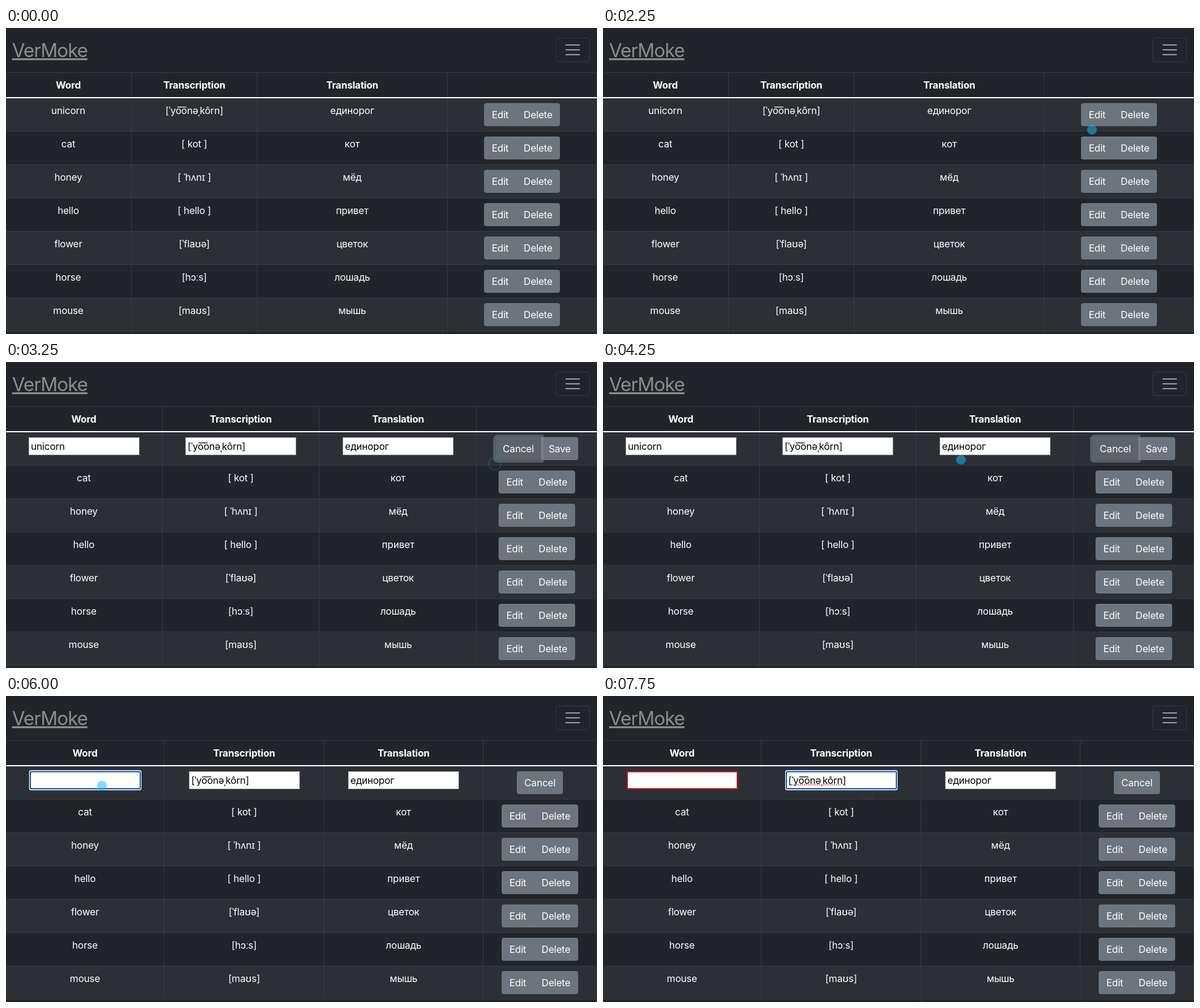
An HTML page that plays this animation: 973x505 px, repeating every 8 s.

```html
<!DOCTYPE html>
<html lang="en">
<head>
<meta charset="utf-8">
<style>
  html, body { margin: 0; width: 100%; height: 100%; overflow: hidden; background: #212529; }
  svg { display: block; font: 16px Inter, "Noto Sans", "DejaVu Sans", sans-serif; letter-spacing: -.2px; fill: #fff; }
  .mid { text-anchor: middle; }
  .head { font-weight: 700; }
  .brand { font-size: 31px; letter-spacing: -1px; fill: #8c8c8c; text-decoration: underline; text-decoration-thickness: 2px; }
</style>
</head>
<body>
<svg id="stage" width="973" height="505" viewBox="0 0 973 505"></svg>
<script>
const LOOP = 8000, STEP = 250;
const words = [
  ['unicorn', '[ˈyoonəˌkôrn]', 'единорог'],
  ['cat', '[ kot ]', 'кот'],
  ['honey', '[ ˈhʌnɪ ]', 'мёд'],
  ['hello', '[ hello ]', 'привет'],
  ['flower', '[ˈflaʊə]', 'цветок'],
  ['horse', '[hɔːs]', 'лошадь'],
  ['mouse', '[maʊs]', 'мышь']
];
const layouts = {
  view:  { lines: [206.5, 413.5, 726.5], centers: [102.5, 310, 570], buttons: 787 },
  edit:  { lines: [257.5, 515.5, 774.5], centers: [128, 386.5, 645.5], buttons: 811 },
  empty: { lines: [260.5, 523.5, 785.5], centers: [130, 392, 654.5], buttons: 816 }
};
// Pointer path: time, x, y
const path = [
  [750, 822, 175], [1500, 529, 126], [1750, 704, 148], [2000, 809, 175], [2250, 805, 168],
  [4000, 805, 168], [4750, 158, 148], [6250, 158, 148], [7000, 434, 139], [7250, 434, 161], [LOOP, 434, 161]
];

const rect = (x, y, w, h, fill, extra = '') =>
  `<rect x="${x}" y="${y}" width="${w}" height="${h}" fill="${fill}" ${extra}/>`;
const line = (x1, y1, x2, y2, color, width = 1, extra = '') =>
  `<path d="M${x1} ${y1}L${x2} ${y2}" stroke="${color}" stroke-width="${width}" ${extra}/>`;
const text = (x, y, s, cls = 'mid', extra = '') =>
  `<text x="${x}" y="${y}" class="${cls}" ${extra}>${s}</text>`;
const macron = (x, y, color) => line(x, y, x + 15, y, color, 1.3);

// Rounded box with separate radii for its left and right corners
function box(x, y, w, h, left, right, fill) {
  return `<path fill="${fill}" d="M${x + left} ${y}H${x + w - right}q${right} 0 ${right} ${right}V${y + h - right}` +
    `q0 ${right} ${-right} ${right}H${x + left}q${-left} 0 ${-left} ${-left}V${y + left}q0 ${-left} ${left} ${-left}z"/>`;
}

// Joined buttons: items are [label, width]; the focused one is darker and has a halo
function buttonGroup(x, y, items, focused = -1) {
  const total = items.reduce((sum, [, w]) => sum + w, 0);
  let out = box(x, y, total, 38, 4, 4, '#6c757d'), labels = '', left = x;
  items.forEach(([label, w], i) => {
    if (i === focused) {
      const l = i ? 0 : 4, r = i < items.length - 1 ? 0 : 4;
      out += box(left - 4, y - 4, w + 8, 46, l * 2, r * 2, 'rgba(130,138,145,.5)');
      out += box(left, y, w, 38, l, r, '#5c636a');
    }
    labels += text(left + w / 2, y + 25, label);
    left += w;
  });
  return out + labels;
}

function input(center, value, state) {
  const x = Math.round(center - 91.5);
  let out = rect(x + .5, 124.5, 182, 29, '#fff', 'stroke="#767676"');
  if (state === 'focus') {
    out = rect(x - 1, 122.5, 185, 33, '#fff', 'rx="3"') +
      rect(x + 1, 125, 181, 28, '#fff', 'rx="1" stroke="#105bc6" stroke-width="2"');
  } else if (state === 'invalid') {
    out = rect(x + 1, 125, 181, 28, '#fff', 'stroke="#d3141e" stroke-width="2"');
  }
  return out + text(x + 4, 145, value, '', 'fill="#000"');
}

function pointer(t) {
  if (t < 750) return '';
  const i = path.findIndex(p => p[0] > t), [t0, x0, y0] = path[i - 1], [t1, x1, y1] = path[i];
  const k = (t - t0) / (t1 - t0), x = x0 + (x1 - x0) * k, y = y0 + (y1 - y0) * k;
  const clicked = (t >= 2750 && t < 4000) || t >= 7500;
  if (!clicked) return `<circle cx="${x}" cy="${y}" r="8" fill="rgba(15,190,248,.53)"/>`;
  const alpha = t >= 7750 ? .1 : t >= 3750 && t < 4000 ? 0 : .35;
  return `<circle cx="${x}" cy="${y}" r="10" fill="none" stroke="rgba(15,150,205,${alpha})" stroke-width="1.5"/>`;
}

function header() {
  return text(10, 48, 'VerMoke', 'brand') +
    rect(905.5, 16.5, 55, 39, 'none', 'rx="4" stroke="#373b3e"') +
    [28, 36, 44].map(y => line(922, y, 944, y, '#9b9d9f', 2, 'stroke-linecap="round"')).join('');
}

function editor(t, mode, layout) {
  const value = t < 5250 ? 'unicorn' : t < 5500 ? 'unico' : t < 5750 ? 'uni' : t < 6000 ? 'u' : '';
  const typing = t >= 4750 && t < 7500, onSecond = t >= 7500;
  const [a, b, c] = layout.centers, left = Math.round(b - 91.5) + 4;
  let out = input(a, value, typing ? 'focus' : onSecond ? 'invalid' : '') +
    input(b, words[0][1], onSecond ? 'focus' : '') + macron(left + 18, 133.5, '#000') +
    input(c, words[0][2]);
  if (onSecond) out += line(left + 5, 146.5, left + 86, 146.5, '#f2555a', 2, 'stroke-dasharray="2 1.5"');
  if (t >= 7500 && t < 7750) out += line(397.5, 130, 397.5, 148, '#000');
  return out + (mode === 'empty'
    ? buttonGroup(841, 124, [['Cancel', 76]])
    : buttonGroup(806, 124, [['Cancel', 75], ['Save', 61]], t < 4750 ? 0 : -1));
}

function table(t) {
  const mode = t < 3250 ? 'view' : t < 6000 ? 'edit' : 'empty', layout = layouts[mode];
  const border = '#373b3e', pair = [['Edit', 53], ['Delete', mode === 'view' ? 72 : 73]];
  let out = line(0, 73.5, 973, 73.5, border);
  words.forEach((_, i) => {
    const top = 116 + 55 * i;
    if (i % 2 === 0) out += rect(0, top, 973, 54, '#2c3034');
    out += line(0, top + 54.5, 973, top + 54.5, border);
  });
  [...layout.lines, 972.5].forEach(x => out += line(x, 74, x, 505, border));
  out += line(0, 115, 973, 115, '#fff', 2);
  ['Word', 'Transcription', 'Translation'].forEach((s, i) => out += text(layout.centers[i], 100, s, 'mid head'));
  words.forEach((row, i) => {
    if (i === 0 && mode !== 'view') {
      out += editor(t, mode, layout);
      return;
    }
    row.forEach((s, col) => out += text(layout.centers[col], 142 + 55 * i, s));
    if (i === 0) out += macron(282, 130.5, '#fff');
    out += buttonGroup(layout.buttons, 124 + 55 * i, pair, i === 0 && t >= 3000 ? 1 : -1);
  });
  return out;
}

const stage = document.getElementById('stage');
let shown = -1;
function draw() {
  const t = Math.floor(performance.now() % LOOP / STEP) * STEP;
  if (t !== shown) {
    stage.innerHTML = header() + table(t) + pointer(t);
    shown = t;
  }
  requestAnimationFrame(draw);
}
draw();
</script>
</body>
</html>
```
